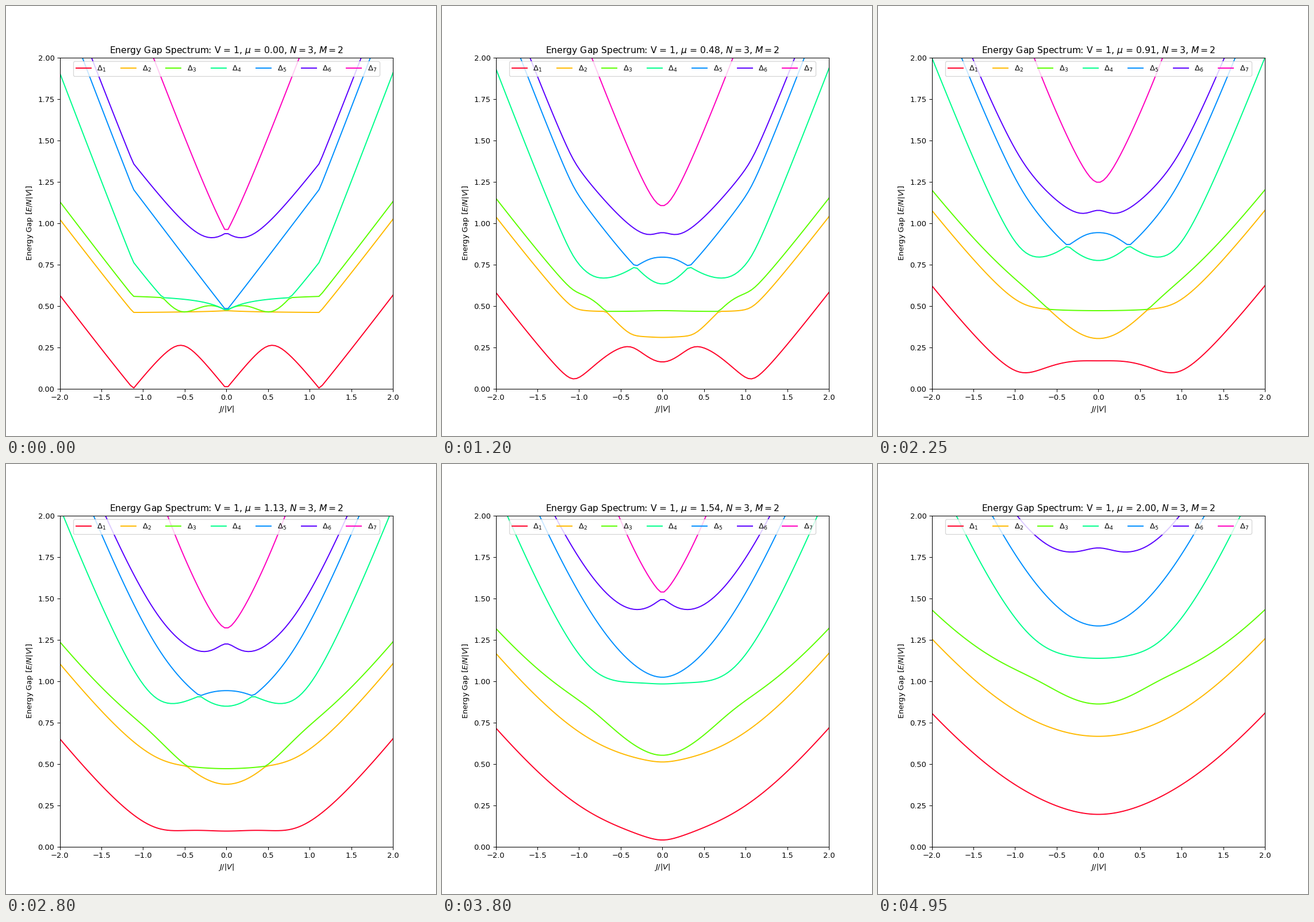
Recreate the animation shown at these times as a matplotlib script. Size 748 by 748 pixels, loop 5000 ms.

```python
import numpy as np
import matplotlib.pyplot as plt
from matplotlib.animation import FuncAnimation

SITES, LEVELS = 3, 2
V = 1.0
FRAMES, INTERVAL = 100, 50
DIM = LEVELS ** SITES

J = np.linspace(-2, 2, 100)
MU = np.linspace(0, 2, FRAMES)

LOWER = np.diag(np.sqrt(np.arange(1, LEVELS)), 1)


def on_site(op, site):
    """Embed a single-site operator in the full chain."""
    full = np.eye(1)
    for k in range(SITES):
        full = np.kron(full, op if k == site else np.eye(LEVELS))
    return full


b = [on_site(LOWER, k) for k in range(SITES)]
hop = sum(b[k].T @ b[k + 1] + b[k + 1].T @ b[k] for k in range(SITES - 1))
drive = sum(x + x.T for x in b)
number = sum(x.T @ x for x in b)


def gaps(mu):
    """Excitation energies per site, one row per level above the ground state."""
    h = V * hop - mu * number + J[:, None, None] * drive
    energy = np.linalg.eigvalsh(h)
    return (energy[:, 1:] - energy[:, :1]).T / (SITES * abs(V))


def title_text(mu):
    return (rf"Energy Gap Spectrum: V = {V:.0f}, $\mu$ = {mu:.2f}, "
            rf"$N={SITES}$, $M={LEVELS}$")


fig, ax = plt.subplots(figsize=(8, 8), dpi=93.5)
colors = plt.get_cmap("gist_rainbow")(np.linspace(0, 1, DIM - 1))
lines = [ax.plot(J, gap, color=c, label=rf"$\Delta_{n}$")[0]
         for n, (gap, c) in enumerate(zip(gaps(MU[0]), colors), 1)]
ax.set(xlim=(-2, 2), ylim=(0, 2), xlabel=r"$J/|V|$",
       ylabel=r"Energy Gap $[E/N|V|]$")
ax.legend(loc="upper center", ncol=DIM - 1)
title = ax.set_title(title_text(MU[0]))


def update(i):
    for line, gap in zip(lines, gaps(MU[i])):
        line.set_ydata(gap)
    title.set_text(title_text(MU[i]))
    return [*lines, title]


anim = FuncAnimation(fig, update, frames=FRAMES, interval=INTERVAL, repeat=True)
plt.show()
```
